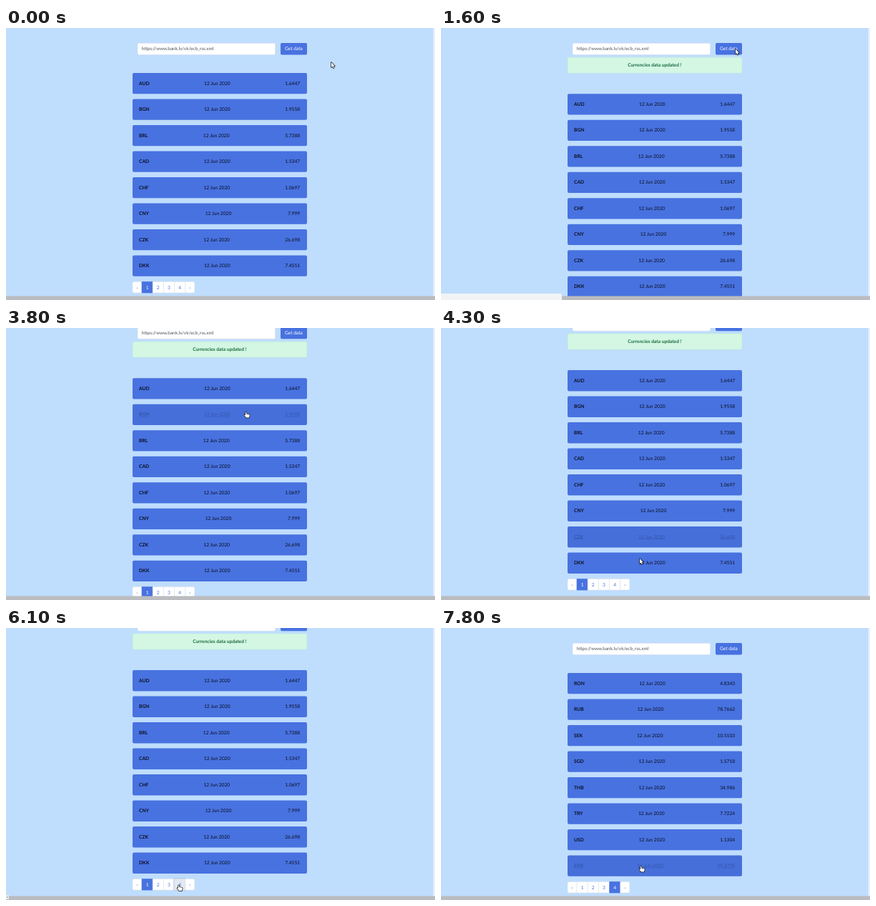
An HTML page with a canvas for the animation above (8000 ms loop, 600x381 px).

```html
<!DOCTYPE html>
<html lang="en">
<head>
<meta charset="utf-8">
<title>Currency rates</title>
<style>
  html, body { margin: 0; width: 100%; height: 100%; overflow: hidden; background: #bfddfd; }
  canvas { display: block; }
</style>
</head>
<body>
<canvas id="stage" width="600" height="381"></canvas>
<script>
const ctx = document.getElementById('stage').getContext('2d');
const LOOP = 8000, STEP = 100;
const BLUE = '#4872e0', INK = '#0a0f1e', DATE = '12 Jun 2020';
const ROW = { x: 177, w: 244, h: 29.3, pitch: 36.5, top: 63 };
const ALERT_AT = 1600, PAGE_AT = 6400;

const parseRates = text => text.split(',').map(item => item.trim().split(' '));
const firstPage = parseRates('AUD 1.6447, BGN 1.9558, BRL 5.7388, CAD 1.5347, CHF 1.0697, CNY 7.999, CZK 26.698, DKK 7.4551');
const lastPage = parseRates('RON 4.8343, RUB 78.7662, SEK 10.5103, SGD 1.5718, THB 34.986, TRY 7.7224, USD 1.1304, ZAR 19.2794');

// Pointer waypoints: time, x, y
const pointerPath = [
  [0, 455, 48], [400, 438, 68], [900, 412, 29.5], [1700, 412, 29.5],
  [2400, 345, 180], [2700, 330, 285], [3000, 334, 86], [3300, 334, 82],
  [3800, 335, 117.5], [4000, 315, 215], [4200, 285, 293], [4300, 278, 323],
  [4600, 262, 345], [5100, 241, 360], [7000, 241, 360], [7600, 279, 333.5]
];
const arrow = new Path2D('M0 0V7L1.6 5.6L2.7 8.1L3.9 7.6L2.8 5.2H4.9Z');
const hand = new Path2D('M0 .6Q.7-.3 1.3.6V3L5 3.6Q5.9 3.9 5.7 5L5 8H1L-1.6 4.9Q-1.7 3.8-.7 4.2L0 4.8Z');

function pointerAt(t) {
  t = Math.max(0, t);
  const next = pointerPath.findIndex(p => p[0] > t);
  if (next < 0) return pointerPath.at(-1).slice(1);
  const [t0, x0, y0] = pointerPath[next - 1], [t1, x1, y1] = pointerPath[next];
  const k = (t - t0) / (t1 - t0);
  return [x0 + (x1 - x0) * k, y0 + (y1 - y0) * k];
}

function scrollAt(t) {
  return t >= PAGE_AT ? 0 : 33.2 * Math.min(1, Math.max(0, (t - 3400) / 600));
}

function box(x, y, w, h, fill, radius = 0, stroke) {
  ctx.beginPath();
  ctx.roundRect(x, y, w, h, radius);
  ctx.fillStyle = fill;
  ctx.fill();
  if (!stroke) return;
  ctx.strokeStyle = stroke;
  ctx.lineWidth = 0.6;
  ctx.stroke();
}

function setFont(size = 6.7, weight = 400) {
  ctx.font = `${weight} ${size}px Lato, sans-serif`;
}

function label(text, x, y, color, align = 'left') {
  ctx.textAlign = align;
  ctx.fillStyle = color;
  ctx.fillText(text, x, y);
}

function drawForm(buttonHover) {
  box(184, 21.3, 192.6, 16.2, '#fff', 1.8, '#d3deec');
  setFont(6.4);
  label('https://www.bank.lv/vk/ecb_rss.xml', 189.7, 31.4, '#495057');
  box(384, 21, 37, 16.5, buttonHover ? '#3a62cf' : BLUE, 1.8);
  setFont(6.65);
  label('Get data', 402.4, 31.4, '#fff', 'center');
}

function drawAlert() {
  box(177.2, 41.3, 243.6, 21.8, '#d3f7e2', 1.8, '#c0f0d4');
  setFont(6.6, 700);
  label('Currencies data updated !', 298.8, 54.1, '#19693f', 'center');
}

function drawRow([code, rate], y, hovered) {
  box(ROW.x, y, ROW.w, ROW.h, hovered ? '#466fda' : BLUE, 2);
  const left = ROW.x + 9, right = ROW.x + ROW.w - 9.8, base = y + 16.5;
  const color = hovered ? '#3555ab' : INK;
  setFont(6.7, 700);
  const codeWidth = ctx.measureText(code).width;
  label(code, left, base, color);
  setFont();
  const dateWidth = ctx.measureText(DATE).width, rateWidth = ctx.measureText(rate).width;
  // Equal free space on both sides of the date
  const dateX = (left + codeWidth + right - rateWidth - dateWidth) / 2;
  label(DATE, dateX, base, color);
  label(rate, right, base, color, 'right');
  if (!hovered) return;
  ctx.fillStyle = color;
  [[left, codeWidth], [dateX, dateWidth], [right - rateWidth, rateWidth]]
    .forEach(([x, w]) => ctx.fillRect(x, base + 0.8, w, 0.5));
}

function drawPager(y, active, focused) {
  let x = 177;
  ['‹', '1', '2', '3', '4', '›'].forEach((text, i) => {
    const w = i % 5 ? 15.2 : 13;
    const current = i === active, focus = i === focused && !current;
    const disabled = (i === 0 && active === 1) || (i === 5 && active === 4);
    if (focus) box(x - 1.2, y - 1.2, w + 2.4, 18, '#a9c7ef', 1.5);
    box(x, y, w, 15.6, current ? BLUE : focus ? '#e3e9f2' : '#fff',
      i % 5 ? 0 : i ? [0, 2, 2, 0] : [2, 0, 0, 2], current ? BLUE : '#dee2e6');
    setFont();
    label(text, x + w / 2, y + 10.1, current ? '#fff' : disabled ? '#6c757d' : BLUE, 'center');
    x += w;
  });
}

function drawWindowEdges(t) {
  box(597.5, 0, 2.5, 376, '#e6f0fb');
  box(0, 375.6, 600, 5.4, '#babcbf');
  if ((t >= 1200 && t < 2000) || (t >= 5200 && t < 6100)) box(0, 372, 169, 9, '#f1f3f4', [0, 1.5, 0, 0]);
  if (t >= 6100 && t < PAGE_AT) {
    box(0, 374, 4, 6, '#e8eaec', [0, 1, 0, 0]);
    box(1, 376.5, 1.5, 1, '#777');
  }
}

function drawPointer(x, y, isHand) {
  const shape = isHand ? hand : arrow;
  ctx.save();
  ctx.translate(x, y);
  ctx.lineJoin = 'round';
  ctx.lineWidth = 1.4;
  ctx.strokeStyle = '#111';
  ctx.stroke(shape);
  ctx.fillStyle = '#fff';
  ctx.fill(shape);
  ctx.restore();
}

function render(t) {
  const alert = t >= ALERT_AT && t < PAGE_AT, paged = t >= PAGE_AT;
  const scroll = scrollAt(t), shift = alert ? 29.3 : 0;
  const rates = paged ? lastPage : firstPage;
  const rowY = i => ROW.top + shift + i * ROW.pitch;
  const rowUnder = ([x, y]) => rates.findIndex((_, i) => {
    const dy = y + scroll - rowY(i);
    return x > ROW.x && x < ROW.x + ROW.w && dy > 0 && dy < ROW.h;
  });
  const pointer = pointerAt(t);
  // Hover reacts slightly later than the pointer moves
  const hovered = rowUnder(pointerAt(t - 100));
  const onButton = t >= 900 && t < ALERT_AT;
  const onLink = t >= 5100 && t <= 7000;

  box(0, 0, 600, 381, '#bfddfd');
  ctx.save();
  ctx.translate(0, -scroll);
  drawForm(onButton);
  if (alert) drawAlert();
  rates.forEach((rate, i) => drawRow(rate, rowY(i), i === hovered));
  drawPager(rowY(8) + 0.4, paged ? 4 : 1, onLink ? 4 : -1);
  ctx.restore();
  drawWindowEdges(t);
  drawPointer(...pointer, onButton || onLink || rowUnder(pointerAt(t - 40)) >= 0);
}

ctx.textRendering = 'geometricPrecision';
function tick() {
  const t = performance.now() % LOOP;
  render(Math.floor(t / STEP) * STEP);
  requestAnimationFrame(tick);
}
tick();
</script>
</body>
</html>
```
